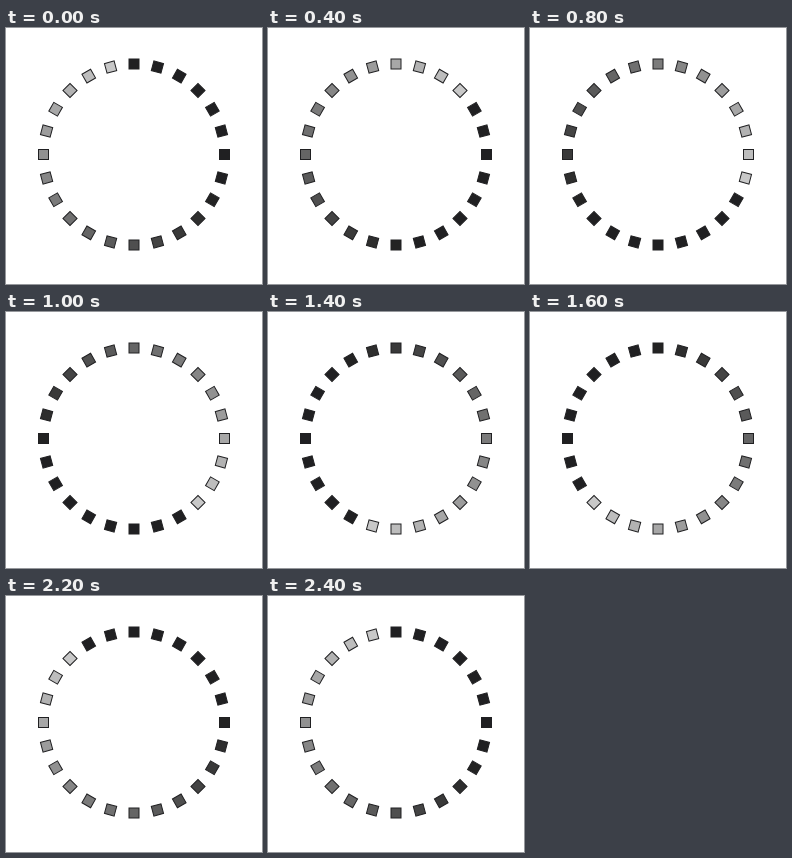
An HTML page for the animation above (2500 ms loop, 256 by 256 pixels).

```html
<!DOCTYPE html>
<html lang="en">
<head>
<meta charset="utf-8">
<title>Ring spinner</title>
<style>
  html, body { margin: 0; width: 100%; height: 100%; overflow: hidden; background: #fff; }
  svg { display: block; width: 256px; height: 256px; }
  rect { stroke: #202022; stroke-width: 1; }
</style>
</head>
<body>
<svg id="ring" viewBox="0 0 256 256"></svg>
<script>
  const COUNT = 24, STEP = 100, LOOP = 2500;
  const CX = 128, CY = 126.5, RADIUS = 90.5, SIZE = 10;
  const ring = document.getElementById('ring');

  const squares = Array.from({ length: COUNT }, (_, i) => {
    const rect = document.createElementNS('http://www.w3.org/2000/svg', 'rect');
    rect.setAttribute('x', -SIZE / 2);
    rect.setAttribute('y', -RADIUS - SIZE / 2);
    rect.setAttribute('width', SIZE);
    rect.setAttribute('height', SIZE);
    rect.setAttribute('transform', `translate(${CX} ${CY}) rotate(${i * 360 / COUNT})`);
    return ring.appendChild(rect);
  });

  // Brightness falls evenly behind the head until it reaches the dark floor.
  function shade(age) {
    const v = Math.max(32, 200 - 11 * age);
    return `rgb(${v},${v},${v === 32 ? 34 : v})`;
  }

  let last = -1;
  function draw(now) {
    // The last step of the loop shows the same pose as the first.
    const step = Math.floor((now % LOOP) / STEP);
    if (step !== last) {
      const head = (step + COUNT - 1) % COUNT;
      squares.forEach((rect, i) => rect.setAttribute('fill', shade((head - i + COUNT) % COUNT)));
      last = step;
    }
  }

  const start = performance.now();
  function tick() {
    draw(performance.now() - start);
    requestAnimationFrame(tick);
  }
  tick();
</script>
</body>
</html>
```
